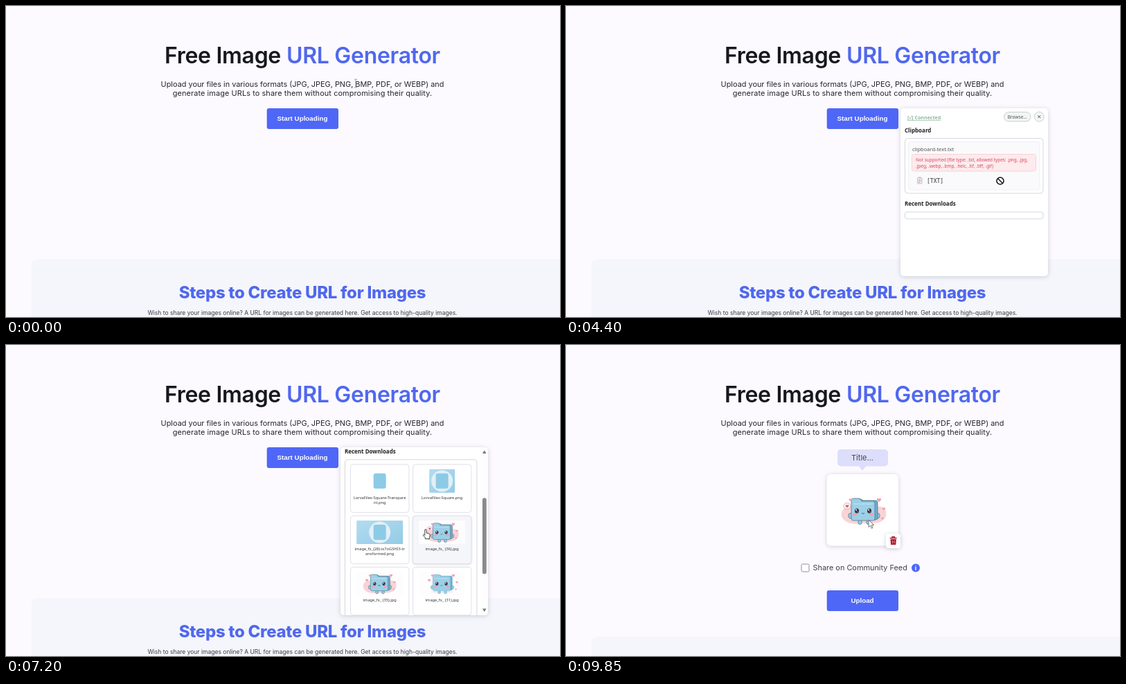
Write an HTML page that moves like this. It is 800x450 px and loops after 9900 ms.

```html
<!DOCTYPE html>
<html lang="en">
<head>
<meta charset="utf-8">
<title>Free Image URL Generator</title>
<style>
html, body { margin: 0; width: 100%; height: 100%; overflow: hidden; background: #fcfafe; }
svg { display: block; width: 100vw; height: 100vh; }
text { white-space: pre; font-style: normal; }
.inter { font-family: Inter, sans-serif; }
.ui { font-family: "Noto Sans", "Open Sans", sans-serif; }
.btn { font: bold 9.8px "Liberation Sans", Arial, sans-serif; fill: #fff; }
.mid { text-anchor: middle; }
.h1 { font-size: 32px; font-weight: 600; letter-spacing: -.3px; }
.h2 { font-size: 24px; font-weight: 800; letter-spacing: -.3px; }
.soft { filter: drop-shadow(0 1px 3px rgba(30, 30, 70, .2)); }
.lift { filter: drop-shadow(0 1px 1.5px rgba(30, 30, 70, .14)); }
</style>
</head>
<body>
<svg id="stage" viewBox="0 0 800 450" xmlns="http://www.w3.org/2000/svg"></svg>
<script>
const LOOP = 9900, OPEN = 850, LOADED = 5500, CLOSE = 8600;
const BLUE = '#4f67f7', TITLE = '#5068ee';

const rect = (x, y, w, h, r, fill, stroke, extra = '') =>
  `<rect x="${x}" y="${y}" width="${w}" height="${h}" rx="${r}" fill="${fill}"` +
  (stroke ? ` stroke="${stroke}"` : '') + ` ${extra}/>`;
const text = (x, y, s, cls, size, fill, extra = '') =>
  `<text x="${x}" y="${y}" class="${cls}"` + (size ? ` font-size="${size}"` : '') +
  (fill ? ` fill="${fill}"` : '') + ` ${extra}>${s}</text>`;
const oval = (x, y, rx, ry, fill, extra = '') =>
  `<ellipse cx="${x}" cy="${y}" rx="${rx}" ry="${ry}" fill="${fill}" ${extra}/>`;
const path = (d, fill, extra = '') => `<path d="${d}" fill="${fill}" ${extra}/>`;
const group = (id, body, extra = '') => `<g id="${id}" ${extra}>${body}</g>`;
const heart = (x, y, s, fill = '#f3a0ae') =>
  path('M0 3C-5 0-3-4 0-1.6C3-4 5 0 0 3Z', fill, `transform="translate(${x} ${y}) scale(${s})"`);

// Cute folder drawing, centred on 0,0
function folder(kind) {
  const line = kind === 'plain' ? '#86bfd8' : '#5a7f98';
  const edge = `stroke="${line}" stroke-width=".9"`;
  const eye = x => oval(x, 0, 3, 3.5, '#38303f') + oval(x - .9, -1.3, 1, 1.1, '#fff') +
    oval(x + .9, 1.4, .6, .6, '#9cc9e6');
  const legs = [-8, 4].map(x => rect(x, 13, 5, 6.5, 2.2, '#97cde5', '', edge)).join('');
  const blob = kind === 'plain' ? oval(0, 16, 22, 2.5, '#fbeaea')
    : path('M-32 8C-34-4-24-7-16-6C-8-19 12-17 18-6C28-9 36 0 31 10C25 20 8 18 0 18C-12 20-28 19-32 8Z', '#f9d3d6');
  const arms = oval(-19, 7, 3.2, 3.8, '#97cde5', edge) + oval(20, 7, 3.2, 3.8, '#97cde5', edge);
  const bubble = kind === 'bubble'
    ? oval(-24, -7, 5, 4.4, '#fff', 'stroke="#c79aa6" stroke-width=".8"') + heart(-24, -7, .8, '#e35d74') : heart(-25, -7, .9);
  return blob + legs + arms +
    path('M-15-17H-4L-1-15H17Q20-15 20-12V10Q20 13 17 13H-15Z', '#6fabcb', edge) +
    path('M-18-15Q-18-18-15-18H-6L-3-14H13Q16-14 16-11V11Q16 14 13 14H-15Q-18 14-18 11Z', '#9bd0e7', edge) +
    path('M-15-10H13', 'none', 'stroke="#bfe4f2" stroke-width="1.2"') +
    eye(-10) + eye(8) + oval(-13, 5.500, 3, 1.8, '#f4a0aa') + oval(11, 5.500, 3, 1.8, '#f4a0aa') +
    path('M-3 3Q-1 5.5 1 3', kind === 'happy' ? '#d3505f' : 'none', 'stroke="#4a4350" stroke-width=".8"') +
    bubble + heart(-19, -16, .8) + heart(22, -16, 1) + heart(29, -3, .75) + heart(27, 11, .6);
}
const art = (kind, x, y, s) => `<g transform="translate(${x} ${y}) scale(${s})">${folder(kind)}</g>`;

// Plain stand-in tile on its backdrop
function tile(x, y, w) {
  const back = w ? rect(x - w / 2, y - 17, w, 34, 1, 'url(#sky)') + oval(x, y, 15.5, 15.5, '#e2eff6') : '';
  return back + rect(x - 9, y - 11, 18, 22, 3, '#8ccbe6');
}

function card(col, row, pic, lines, id = '') {
  const x = col ? 587.5 : 497.5, y = 305.3 + row * 74.3, cx = x + 42.2;
  return group(id || 'c' + col + row,
    rect(x, y, 84.5, 69.5, 4, '#fff', '#dfe0e8') + pic(cx, y + 24) +
    lines.map((s, i) => text(cx, y + 50 + i * 7, s, 'ui mid', 5.7, '#333', 'font-weight="500"')).join(''));
}

function clip(w, lines) {
  return rect(489.5, 191.5, w, 79.5, 4, '#fff', '#d6d7df') +
    rect(494.5, 196.5, w - 10, 69.5, 3, '#fafafc', '#f0f0f4') +
    text(500, 210, 'clipboard-text.txt', 'ui', 7.5, '#555') +
    rect(499.5, 214.5, w - 20.5, 24.5, 3, '#fdebed', '#f8d3d7') +
    lines.map((s, i) => text(505, 224.8 + i * 9, s, 'ui', 6.4, '#d5485b')).join('') +
    rect(507.5, 248.5, 6.5, 8.5, 1, '#f5eeee', '#bba9ab', 'stroke-width=".8"') +
    path('M509 248h3.5M509 251.5h3.5M509 253.5h3.5M509 255.4h2', 'none', 'stroke="#b09a9d" stroke-width=".8"') +
    text(521, 255.5, '[TXT]', '', 8, '#333', `font-family="'DejaVu Sans Mono', monospace"`);
}

const head = text(493, 164.3, '[√] Connected', 'ui', 7.1, '#8fb79c',
    'font-weight="600" text-decoration="underline"') +
  rect(632.5, 153.5, 38.5, 13.5, 6.7, '#f1f5f4', '#c9d0ce') +
  text(651.7, 162.6, 'Browse...', 'ui mid', 6.6, '#555') +
  oval(683.3, 160.2, 7, 7, '#f4f7f6', 'stroke="#c9d0ce"') +
  path('M681.3 158.2l4 4m0-4l-4 4', 'none', 'stroke="#444" stroke-width=".9"') +
  text(489, 183.4, 'Clipboard', 'ui', 8, '#222', 'font-weight="700"');

const fx = kind => (x, y) => rect(x - 33.5, y - 17, 67, 34, 1, '#fefdfd') + art(kind, x, y, .74);
const cards =
  card(0, 0, (x, y) => tile(x, y, 0), ['LorvaFiles-Square-Transpare', 'nt.png']) +
  card(1, 0, (x, y) => tile(x, y, 37), ['LorvaFiles-Square.png']) +
  card(0, 1, (x, y) => tile(x, y, 67), ['image_fx_(28)-ix7oGSHI3-tr', 'ansformed.png']) +
  card(1, 1, fx('bubble'), ['image_fx_ (36).jpg'], 'pick') +
  card(0, 2, fx('happy'), ['image_fx_ (35).jpg']) +
  card(1, 2, fx('plain'), ['image_fx_ (31).jpg']) +
  card(0, 3, (x, y) => tile(x, y, 67), []);

const popup = rect(483, 148, 213, 243, 5, '#fff', '', 'class="soft"') +
  `<g clip-path="url(#pop)">` + group('scroll', head +
    group('wide', clip(199.5, ['Not supported (file type: .txt, allowed types: .png, .jpg,',
      '.jpeg, .webp, .bmp, .heic, .tif, .tiff, .gif)']) +
      rect(489.5, 298, 199.5, 10, 3, '#fff', '#d6d7df')) +
    group('narrow', clip(190.5, ['Not supported (file type: .txt, allowed types: .png,',
      '.jpg, .jpeg, .webp, .bmp, .heic, .tif, .tiff, .gif)']) +
      rect(489.5, 298.3, 190.5, 307, 4, '#fff', '#d6d7df') + cards) +
    text(489, 289, 'Recent Downloads', 'ui', 8, '#222', 'font-weight="700"')) +
  group('bar', rect(685, 148, 11, 243, 0, '#fdfdfd') +
    path('M688 157l2.8-4.5 2.8 4.5zM688 381.5l2.8 4.5 2.8-4.5z', '#777') +
    rect(688, 162, 5.8, 110, 2.9, '#8b8b8d', '', 'id="thumb"')) + '</g>';

const button = (y, s) => rect(376.7, y, 103.3, 30, 3, BLUE) +
  text(428, y + 18, s, 'btn mid');

const before = button(148, 'Start Uploading');
const after =
  rect(392, 151, 73, 24.5, 5, '#dddefc') + path('M422.5 175h11l-5.5 7z', '#dddefc') +
  text(428, 167, 'Title...', 'inter mid', 11, '#444') +
  rect(376.7, 187, 103.3, 103.5, 6, '#fff', '', 'class="soft"') +
  art('bubble', 430, 240, 1) +
  rect(462, 273, 21, 21, 4, '#fff', '', 'class="soft"') +
  path('M467.7 279.5h10M471 279v-1.4h3.4v1.4', 'none', 'stroke="#b3182b" stroke-width="1.5"') +
  path('M468.5 281h8.4l-.6 8h-7.2z', '#b3182b') +
  path('M471.5 283v4M474 283v4', 'none', 'stroke="#f3c4ca" stroke-width=".7"') +
  rect(340, 317, 11, 11, 1.5, '#fff', '#8c8c92') +
  text(356.5, 326.4, 'Share on Community Feed', 'inter', 10.9, '#3f4048') +
  oval(505, 322.5, 6, 6, BLUE) +
  text(505, 326, 'i', 'inter mid', 9, '#fff', 'font-weight="700"') +
  button(355, 'Upload');

const steps = rect(36.5, 366.5, 800, 200, 8, '#f4f6fb') +
  text(428, 422.5, 'Steps to Create URL for Images', 'inter h2 mid', 0, TITLE) +
  text(428, 447, 'Wish to share your images online? A URL for images can be generated here. Get access to high-quality images.',
    'inter mid', 8.5, '#3a3b44');

const cursors =
  group('beam', path('M-2-6h1.5l.5.5.5-.5h1.5M0-5.5v11M-2 6h1.5l.5-.5.5.5h1.5', 'none', 'stroke="#8b8b90" stroke-width=".9"')) +
  group('arrow', path('M0 0V10.5L2.5 8.2L4.3 12.3L6 11.5L4.3 7.6H7.6Z', '#fff', 'stroke="#666" stroke-width=".9"')) +
  group('hand', path('M-1.2 6V1Q-1.2-.3 0-.3T1.2 1V5L5 6Q6.3 6.4 6.2 8L5.5 11.5V13.5H-.5V12L-3.5 8.5Q-3.7 7-2.5 7.2L-1.2 8.5Z', '#fff', 'stroke="#333" stroke-width=".9"')) +
  group('no', oval(0, 0, 5, 5, '#fff', 'stroke="#111" stroke-width="1.5"') +
    path('M-3.5-3.5L3.5 3.5', 'none', 'stroke="#111" stroke-width="1.5"'));

const $ = id => document.getElementById(id);
$('stage').innerHTML =
  `<defs><clipPath id="pop">${rect(483, 148, 213, 243, 5, '#fff')}</clipPath>
  <linearGradient id="sky" x2="1" y2="1"><stop stop-color="#b2dcf0"/><stop offset="1" stop-color="#94cbe6"/></linearGradient></defs>` +
  rect(0, 0, 800, 450, 0, '#fcfafe') +
  text(313, 83, 'Free Image', 'inter h1 mid', 0, '#17181f') +
  text(516, 83, 'URL Generator', 'inter h1 mid', 0, TITLE) +
  text(428, 117.3, 'Upload your files in various formats (JPG, JPEG, PNG, BMP, PDF, or WEBP) and', 'inter mid', 10.9, '#24252d') +
  text(428, 130.3, 'generate image URLs to share them without compromising their quality.', 'inter mid', 10.9, '#24252d', 'letter-spacing=".1"') +
  group('steps', steps) + group('before', before) + group('after', after) +
  group('popup', popup) + group('cursor', cursors);

// Keys are [time, ...values], eased between neighbours
const moves = [[0, 505, 112], [150, 505, 112], [620, 440, 166], [1100, 440, 166], [1800, 519, 235],
  [3100, 519, 235], [3900, 627, 253], [6800, 627, 253], [7100, 606, 267], [7300, 606, 267],
  [7850, 631, 230], [8900, 631, 230], [9600, 437, 253]];
const scrolls = [[6230, 0], [6420, 51], [6720, 51], [6950, 132.5], [7450, 132.5], [7700, 182]];
const shapes = [[0, 'beam'], [300, 'arrow'], [500, 'hand'], [1280, 'arrow'], [1450, 'no'], [6880, 'hand'], [7900, 'arrow']];

function at(keys, t) {
  const i = keys.findIndex(k => k[0] > t);
  if (i < 0) return keys[keys.length - 1].slice(1);
  if (i === 0) return keys[0].slice(1);
  const a = keys[i - 1], b = keys[i], p = (t - a[0]) / (b[0] - a[0]), e = p * p * (3 - 2 * p);
  return a.slice(1).map((v, n) => v + (b[n + 1] - v) * e);
}
const show = (id, on) => $(id).setAttribute('display', on ? 'inline' : 'none');

function draw(t) {
  const [x, y] = at(moves, t), [s] = at(scrolls, t);
  const loaded = t >= LOADED, done = t >= CLOSE;
  show('popup', t >= OPEN && !done);
  show('wide', !loaded);
  show('narrow', loaded);
  show('bar', loaded);
  show('before', !done);
  show('after', done);
  $('steps').setAttribute('transform', `translate(0 ${done ? 56 : 0})`);
  $('scroll').setAttribute('transform', `translate(0 ${-s})`);
  $('thumb').setAttribute('y', 162 + s * .448);
  const hover = t >= 6880;
  const box = $('pick').firstElementChild;
  box.setAttribute('fill', hover ? '#f4f6f9' : '#fff');
  box.setAttribute('class', hover ? 'lift' : '');
  $('cursor').setAttribute('transform', `translate(${x} ${y})`);
  const shape = shapes.filter(k => k[0] <= t).pop()[1];
  for (const id of ['beam', 'arrow', 'hand', 'no']) show(id, id === shape);
}

const start = performance.now();
function tick() {
  draw((performance.now() - start) % LOOP);
  requestAnimationFrame(tick);
}
draw(0);
requestAnimationFrame(tick);
</script>
</body>
</html>
```
